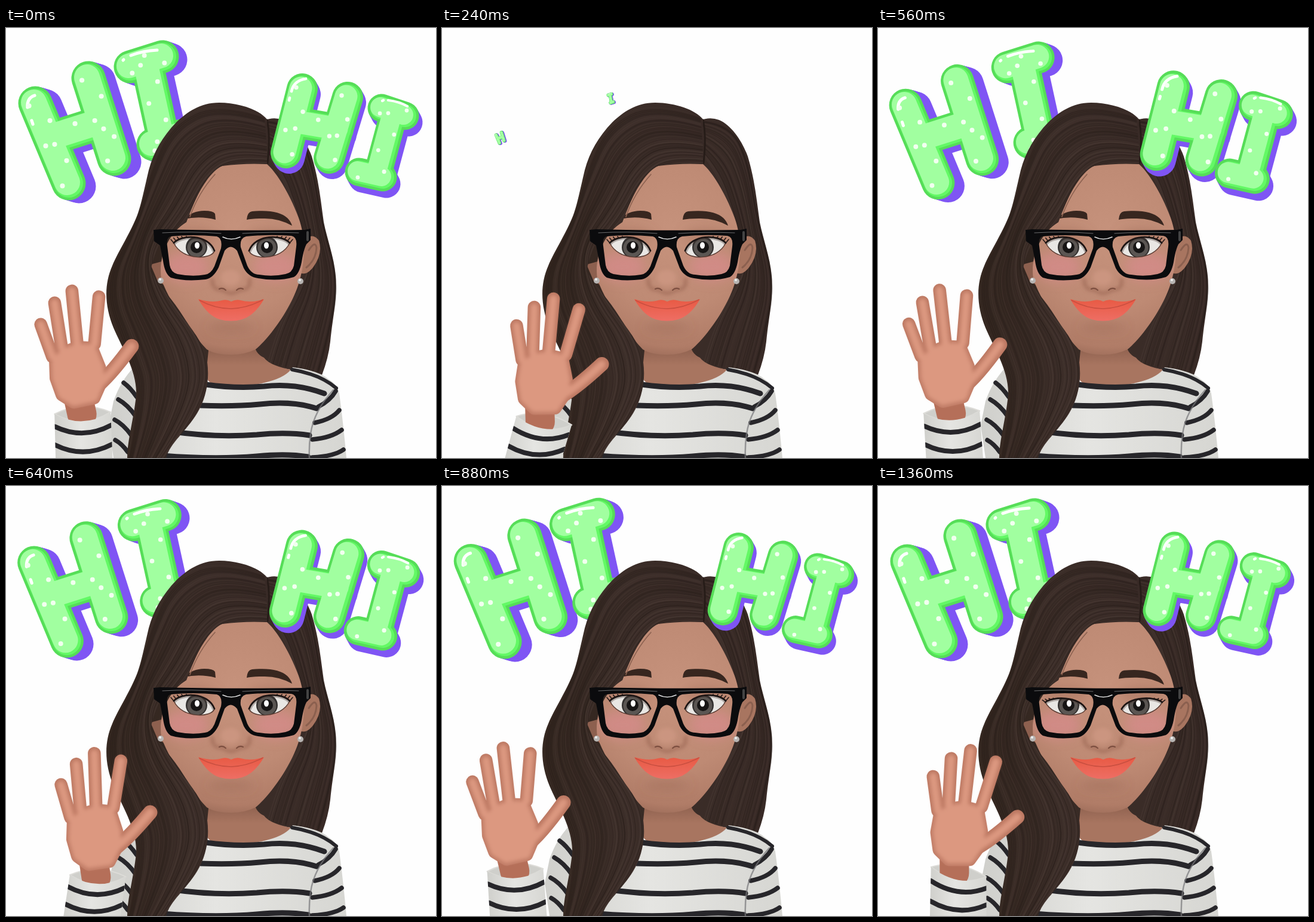
Animation, 720 px wide and 720 px high, one loop 1440 ms. Source, as an HTML page:

```html
<!DOCTYPE html>
<html lang="en">
<head>
<meta charset="utf-8">
<title>Waving hello</title>
<style>
html, body { margin: 0; width: 100%; height: 100%; overflow: hidden; background: #fefefe; }
svg { display: block; width: 100vw; height: 100vh; }
path { stroke-linecap: round; stroke-linejoin: round; }
</style>
</head>
<body>
<svg viewBox="0 0 720 720">
<defs>
  <radialGradient id="skin" gradientUnits="userSpaceOnUse" cx="388" cy="345" r="210">
    <stop offset="0" stop-color="#c6927c"/><stop offset=".6" stop-color="#be8a74"/>
    <stop offset=".9" stop-color="#b07c67"/><stop offset="1" stop-color="#9c6c59"/>
  </radialGradient>
  <linearGradient id="neck" x1="0" y1="0" x2="0" y2="1">
    <stop offset="0" stop-color="#875b4a"/><stop offset=".5" stop-color="#a87560"/>
  </linearGradient>
  <linearGradient id="cloth" x1="0" y1="0" x2="1" y2="0">
    <stop offset="0" stop-color="#cfcfcb"/><stop offset=".45" stop-color="#e5e5e2"/><stop offset="1" stop-color="#d6d6d2"/>
  </linearGradient>
  <linearGradient id="lip" x1="0" y1="0" x2="0" y2="1">
    <stop offset="0" stop-color="#e85a44"/><stop offset="1" stop-color="#ee6e64"/>
  </linearGradient>
  <linearGradient id="hair" x1="0" y1="0" x2="1" y2="0">
    <stop offset="0" stop-color="#33261f"/><stop offset=".5" stop-color="#3b2d28"/><stop offset="1" stop-color="#382a26"/>
  </linearGradient>
  <filter id="soft" x="-30%" y="-30%" width="160%" height="160%"><feGaussianBlur stdDeviation="3"/></filter>
  <filter id="haze" x="-60%" y="-60%" width="220%" height="220%"><feGaussianBlur stdDeviation="9"/></filter>
  <path id="face" d="M362 231Q400 226 437 228C455 243 478 285 490 318C500 345 503 385 491 425C478 470 440 520 418 538Q400 547 377 547Q350 547 336 538C300 500 270 450 260 420C255 385 270 345 302 325C315 285 340 240 362 231Z"/>
  <path id="lock" d="M437 153C425 137 390 125 357 125C325 125 303 141 285 158C262 182 247 208 239 238C229 280 225 305 214 327C200 357 186 378 178 398C164 430 165 465 180 502C194 535 220 575 218 615C214 655 203 690 203 720L268 720C274 695 302 675 320 645C335 620 341 590 337 560C334 530 312 508 298 485C278 452 262 440 242 407C246 385 254 365 264 348Q286 336 302 325C318 285 335 240 362 231Q400 221 437 228Z"/>
  <clipPath id="inLock"><use href="#lock"/></clipPath>
  <clipPath id="inFace"><use href="#face"/></clipPath>
  <clipPath id="inEye"><path id="eyeClip"/></clipPath>
  <clipPath id="inSleeve"><path id="sleeveClip"/></clipPath>
  <g id="eye">
    <g clip-path="url(#inEye)">
      <rect x="270" y="340" width="90" height="55" fill="#e9e7e4"/>
      <circle cx="319" cy="367" r="18" fill="#33302f"/>
      <circle cx="319" cy="368" r="15.5" fill="#5b5653"/>
      <circle cx="319" cy="367" r="10" fill="#171515"/>
      <path class="lash" fill="none" stroke="#4a3a36" stroke-opacity=".35" stroke-width="8"/>
      <ellipse cx="320" cy="364" rx="4" ry="5.5" fill="#fff"/>
    </g>
    <path id="rim" fill="none" stroke="#5a3c33" stroke-width="1.5"/>
    <path class="lash" fill="none" stroke="#1c1413" stroke-width="2.8"/>
    <path id="lashes" fill="none" stroke="#211816" stroke-width="1.6"/>
  </g>
</defs>

<g id="leftWord"></g>

<!-- back hair, ears, neck -->
<path fill="url(#hair)" d="M432 155Q448 148 464 154C485 163 503 190 512 215C524 255 527 290 532 325C538 355 549 382 552 415C555 455 546 490 543 525Q540 552 529 581L435 565L330 560L205 430L235 320L300 180Z"/>
<g id="rightHair" fill="none"></g>
<path d="M437 154Q443 180 438 226" fill="none" stroke="#261c18" stroke-width="3"/>
<path d="M496 360Q512 339 524 356Q531 378 514 401Q502 416 490 409Z" fill="#a87560"/>
<path d="M507 372Q518 355 520 368Q519 388 503 401" fill="none" stroke="#8b604f" stroke-width="3"/>
<path d="M242 396L264 390L268 432L254 424Z" fill="#8d604f"/>
<path d="M340 530L335 580Q334 604 400 604Q460 600 482 573Q442 566 432 552Q416 545 415 525Z" fill="url(#neck)"/>

<!-- shirt -->
<path d="M480 568Q525 574 540 588Q555 597 558 612Q564 655 570 720H180L172 665L180 625Q192 590 216 566L320 592Q395 606 440 592Q470 584 480 568Z" fill="url(#cloth)"/>
<g fill="none" stroke="#27262a" stroke-width="7.5">
  <path d="M335 597Q385 604 432 600Q485 594 533 612M326 632Q380 634 425 630Q480 624 520 637M280 676Q350 686 420 681Q470 676 508 682M262 716Q350 723 420 717Q470 712 506 718" stroke-width="9"/>
  <path d="M479 572Q526 580 553 603" stroke-width="6"/>
  <path d="M552 608Q543 624 523 634M558 640Q546 655 517 661M562 673Q545 686 513 689M565 706Q550 717 513 719"/>
  <path d="M197 594Q208 602 219 618M188 622Q204 631 217 650M182 656Q196 663 210 682M183 690Q194 696 204 710"/>
</g>
<path d="M548 606Q515 642 510 680Q507 700 508 720" fill="none" stroke="#77777a" stroke-width="2.5" stroke-opacity=".7"/>

<!-- face -->
<use href="#face" fill="url(#skin)"/>
<g clip-path="url(#inFace)">
  <g filter="url(#haze)">
    <ellipse cx="302" cy="400" rx="38" ry="24" fill="#d68b8b" opacity=".75"/>
    <ellipse cx="452" cy="400" rx="38" ry="24" fill="#d68b8b" opacity=".75"/>
    <ellipse cx="316" cy="348" rx="36" ry="12" fill="#a06d59" opacity=".45"/>
    <ellipse cx="440" cy="348" rx="36" ry="12" fill="#a06d59" opacity=".45"/>
    <ellipse cx="377" cy="501" rx="38" ry="7" fill="#925f4e" opacity=".4"/>
  </g>
  <g filter="url(#soft)">
    <path d="M345 420Q345 440 362 438Q377 450 392 438Q410 440 408 420" fill="none" stroke="#9c6855" stroke-width="4"/>
    <ellipse cx="376" cy="418" rx="16" ry="13" fill="#cb9580"/>
  </g>
  <path d="M357 437Q363 434 368 439M386 439Q391 434 397 437" fill="none" stroke="#7d4f40" stroke-width="2"/>
</g>
<path d="M322 454Q345 461 362 456Q370 454 377 458Q385 454 393 456Q410 461 432 454Q416 482 395 488Q377 493 358 488Q338 482 322 454Z" fill="url(#lip)"/>
<path d="M324 456Q350 470 377 470Q405 469 430 455" fill="none" stroke="#c94f40" stroke-width="1.5"/>
<g id="brows" fill="#37261f">
  <path d="M298 320Q312 306 332 306Q347 306 350 311L351 321Q325 314 298 320Z"/>
  <path d="M403 321Q404 308 412 307Q455 303 471 318Q477 324 479 331Q456 318 430 319Q412 319 403 321Z"/>
</g>
<use href="#eye"/>
<use href="#eye" transform="matrix(-1 0 0 1 756 0)"/>

<!-- front hair -->
<use href="#lock" fill="url(#hair)"/>
<g id="leftHair" fill="none" clip-path="url(#inLock)"></g>
<path d="M350 245Q322 276 308 316" fill="none" stroke="#8b6150" stroke-width="1.6"/>
<g fill="#b7b4b2"><circle cx="259" cy="423" r="5"/><circle cx="493" cy="424" r="5"/></g>
<g fill="#eee"><circle cx="258" cy="421" r="2"/><circle cx="492" cy="422" r="2"/></g>

<!-- glasses -->
<path fill="#0b0b0d" fill-rule="evenodd" d="M247 338L258 337Q375 340 500 338L510 336V355L503 362Q498 372 495 392Q491 412 482 417Q455 425 422 419Q406 417 398 402L387 373Q376 360 366 373L356 401Q347 419 334 421Q300 425 276 418Q266 412 263 390L258 364L248 357Z
  M275 349Q268 352 270 365L274 397Q276 409 287 412Q312 417 333 413Q343 412 349 399L360 369Q363 352 353 349Q312 345 275 349Z
  M402 349Q391 352 393 367L404 398Q411 413 424 413Q446 417 468 412Q479 410 482 398L486 366Q488 350 478 348Q440 345 402 349Z"/>
<g fill="none" stroke="#fff">
  <path d="M363 350Q377 357 392 350" stroke-width="1.6" opacity=".85"/>
  <path d="M262 343Q310 340 360 344M396 344Q440 341 490 343" opacity=".4"/>
  <path d="M505 342V355" stroke="#444" stroke-width="4"/>
</g>

<g id="rightWord"></g>
<g id="arm"></g>
</svg>
<script>
const $ = id => document.getElementById(id);
const STEP = 80, COUNT = 18;
const { PI, abs, cos, sin, exp, max, min } = Math;
const lerp = (a, b, t) => a + (b - a) * t;
const mix = (a, b, t) => a.map((v, i) => lerp(v, b[i], t));
const polar = (r, deg) => [r * sin(deg * PI / 180), -r * cos(deg * PI / 180)];
const add = (a, b) => [a[0] + b[0], a[1] + b[1]];

function make(parent, tag, attrs) {
  const el = document.createElementNS('http://www.w3.org/2000/svg', tag);
  for (const k in attrs) el.setAttribute(k, attrs[k]);
  return parent.appendChild(el);
}

function smooth(pts) {
  let d = `M${pts[0]}`;
  for (let i = 1; i < pts.length - 1; i++) {
    const end = i === pts.length - 2 ? pts[i + 1] : mix(pts[i], pts[i + 1], .5);
    d += `Q${pts[i]} ${end}`;
  }
  return d;
}

// Hair strands, spread between two guide curves
let seed = 7;
const rand = () => (seed = seed * 16807 % 2147483647) / 2147483647;
function strands(parent, count, outer, inner) {
  for (let i = 0; i < count; i++) {
    const u = (i + rand()) / count;
    make(parent, 'path', {
      d: smooth(outer.map((p, j) => mix(p, inner[j], u))),
      stroke: rand() < .55 ? '#261c18' : '#4a3b35',
      'stroke-width': .8 + rand() * 2,
      opacity: .15 + rand() * .4
    });
  }
}
strands($('leftHair'), 40,
  [[432, 148], [355, 122], [275, 160], [240, 240], [218, 325], [158, 430], [196, 540], [225, 610], [204, 720]],
  [[438, 226], [385, 222], [340, 250], [300, 325], [240, 385], [275, 450], [345, 535], [340, 630], [268, 720]]);
strands($('rightHair'), 26,
  [[440, 155], [482, 160], [512, 215], [528, 320], [560, 425], [542, 520], [526, 576]],
  [[439, 215], [462, 245], [485, 310], [510, 400], [490, 440], [455, 500], [438, 562]]);

// Balloon letters: bars as [x1, y1, x2, y2], with dots zigzagging along each
function letter(parent, { center: [cx, cy], bars, w, shade: [sx, sy], shine }) {
  const g = make(parent, 'g', {});
  const d = bars.map(([a, b, c, e]) => `M${a} ${b}L${c} ${e}`).join('');
  const line = (stroke, width, x = 0, y = 0, path = d) => make(g, 'path', {
    d: path, fill: 'none', stroke, 'stroke-width': width, transform: `translate(${x} ${y})`
  });
  for (const k of [1, .75, .5, .25]) line('#7f55f4', w, sx * k, sy * k);
  line('#56dd58', w);
  line('#63f965', w - 9);
  line('#a1ffa0', w - 14, -2.5, -1.5);
  line('#fff', w / 11, 0, 0, shine);
  for (const [x1, y1, x2, y2] of bars) {
    const len = Math.hypot(x2 - x1, y2 - y1), n = Math.round(len / 36);
    for (let i = 0; i <= n; i++) {
      const side = (i % 2 ? -1 : 1) * w * .2 / len;
      make(g, 'circle', {
        cx: lerp(x1, x2, i / n) + (y1 - y2) * side,
        cy: lerp(y1, y2, i / n) + (x2 - x1) * side,
        r: w / 14, fill: '#f2fff0'
      });
    }
  }
  return (scale, dx = 0, dy = 0) => {
    g.style.display = scale > 0 ? '' : 'none';
    g.setAttribute('transform', `translate(${cx + dx} ${cy + dy}) scale(${scale}) translate(${-cx} ${-cy})`);
  };
}
const bigH = letter($('leftWord'), {
  center: [122, 174], w: 57, shade: [17, 5], shine: 'M36 133Q35 117 48 113M43 155L45 161',
  bars: [[49, 126, 105, 260], [138, 84, 181, 219], [78, 184, 160, 158]]
});
const bigI = letter($('leftWord'), {
  center: [245, 122], w: 55, shade: [14, 5], shine: 'M209 46Q230 38 253 37M196 54L197 53',
  bars: [[208, 65, 262, 48], [236, 60, 264, 188], [246, 195, 294, 180]]
});
const smallH = letter($('rightWord'), {
  center: [522, 162], w: 52, shade: [5, 9], shine: 'M478 106Q482 88 502 85M475 117L474 121',
  bars: [[496, 102, 469, 209], [572, 116, 541, 218], [486, 158, 556, 170]]
});
const smallI = letter($('rightWord'), {
  center: [632, 198], w: 47, shade: [6, 11], shine: 'M640 121Q658 123 672 131M630 122L632 121',
  bars: [[629, 134, 668, 147], [649, 145, 624, 238], [591, 241, 631, 250]]
});

// Pop-in: grow over `rise` steps, then a damped wobble
function pop(t, rise, amp, decay) {
  if (t < 0) return 0;
  if (t < rise) return lerp(.1, 1, t / rise);
  return 1 + amp * exp(-decay * (t - rise)) * cos(.9 * (t - rise));
}

function setWords(step) {
  const first = step === 0;
  const s = first ? 1 : pop(step - 3, 1, .09, .35);
  const r = first ? 1 : pop(step - 5, 2, .055, .2);
  const spread = max(0, min(1, 7 * (1 - s)));
  bigH(s, -24 * spread, 10 * spread);
  bigI(s, 37 * spread, -4 * spread);
  smallH(r);
  smallI(r);
}

// Eyes: upper and lower lid as cubics that meet when shut
const openLid = [[281, 360], [292, 346], [338, 344], [349, 373]];
const shutLid = [[276, 373], [292, 384], [325, 387], [344, 376]];
const lowLid = [[281, 360], [295, 390], [345, 388], [349, 373]];
const curve = ([a, b, c, d]) => `M${a}C${b} ${c} ${d}`;
function along(pts, t) {
  while (pts.length > 1) pts = pts.slice(1).map((p, i) => mix(pts[i], p, t));
  return pts[0];
}
function setEyes(step) {
  const k = max(0, 1 - abs(step - 14) / (step < 14 ? 2 : 3.6));
  const blend = lid => lid.map((p, i) => mix(p, shutLid[i], k));
  const top = blend(openLid), low = blend(lowLid);
  $('eyeClip').setAttribute('d', `${curve(top)}C${low[2]} ${low[1]} ${low[0]}Z`);
  $('rim').setAttribute('d', curve(low));
  document.querySelectorAll('.lash').forEach(el => el.setAttribute('d', curve(top)));
  let d = '';
  for (let u = 0; u < 1; u += .09) {
    const open = max(0, 1 - 2 * u);
    d += `M${along(top, u)}l${mix([-5 * open, -6 * open], [-4 + 5 * u, 7], k)}`;
  }
  $('lashes').setAttribute('d', d);
  $('brows').setAttribute('transform', `translate(0 ${11 * k})`);
}

// Arm and hand
const fingers = [
  { root: [-41, -26], reach: 100, angle: -34 },
  { root: [-25, -40], reach: 121, angle: -14.5 },
  { root: [1, -46], reach: 135, angle: 0 },
  { root: [30, -45], reach: 130, angle: 20 }
];
const thumb = { root: [26, 30], bend: [50, 14], reach: 100, angle: 69 };
const palm = [[-36, -18], [-22, -32], [1, -40], [25, -38], [37, -5], [38, 20], [26, 45], [-8, 51], [-27, 38], [-36, 10]];

const arm = $('arm');
const part = (attrs, parent = arm) => make(parent, 'path', { fill: 'none', ...attrs });
const cuff = part({ fill: '#cfcfcb', stroke: '#dddcd8', 'stroke-width': 2 });
const wrist = part({ stroke: '#b56f59', 'stroke-width': 49 });
const sleeve = part({ fill: 'url(#cloth)' });
const bands = part({ stroke: '#27262a', 'stroke-width': 8, 'clip-path': 'url(#inSleeve)' });
const palmEdge = part({ fill: '#c07c66', stroke: '#c07c66', 'stroke-width': 22 });
const fingerEdge = part({ stroke: '#bb7761', 'stroke-width': 21.5 });
const thumbEdge = part({ stroke: '#bb7761', 'stroke-width': 24 });
const glow = make(arm, 'g', { filter: 'url(#soft)' });
const palmGlow = part({ fill: '#dc9880', stroke: '#dc9880', 'stroke-width': 13 }, glow);
const fingerGlow = part({ stroke: '#dc9880', 'stroke-width': 13 }, glow);

// Wave phase runs about one sixth of a swing per step, ahead or behind by a little
const drift = [[0, 1], [3, 0], [5, -1], [8, 0], [11, 1], [14, 1], [17, 0]];
function wavePhase(step) {
  const i = max(1, drift.findIndex(([at]) => at >= step));
  const [t0, v0] = drift[i - 1], [t1, v1] = drift[i];
  return step + lerp(v0, v1, (step - t0) / (t1 - t0));
}

function setArm(step) {
  const phase = wavePhase(step);
  const swing = cos((phase - 3.3) * PI / 3);
  const flick = ((1 + cos((phase - 4.15) * PI / 3)) / 2) ** 5;
  const lean = -1 + 4 * swing + 28 * flick, turn = (lean + 2) * PI / 180;
  const center = [142 + 30 * swing, 581 + 8 * swing - 8 * flick];
  const spin = ([x, y]) => [x * cos(turn) - y * sin(turn), x * sin(turn) + y * cos(turn)];
  const local = p => add(center, spin(p));
  const tip = f => add(center, polar(f.reach, lean + f.angle));

  const digits = fingers.map(f => `M${local(f.root)}L${tip(f)}`).join('');
  const thumbLine = `M${local(thumb.root)}Q${local(thumb.bend)} ${tip(thumb)}`;
  const body = `M${palm.map(local).join('L')}Z`;
  palmEdge.setAttribute('d', body);
  palmGlow.setAttribute('d', body);
  fingerEdge.setAttribute('d', digits);
  thumbEdge.setAttribute('d', thumbLine);
  fingerGlow.setAttribute('d', digits + thumbLine);

  const hinge = local([5, 72]), mouth = add(hinge, [lean / 2 + 3, -2]);
  const left = add(mouth, spin([-47, 0])), right = add(mouth, spin([47, 0]));
  const footL = [lerp(85, left[0], .45), 730], footR = [lerp(182, right[0], .45), 730];
  const bow = (a, b, depth) => `Q${add(mix(a, b, .5), [0, depth])} ${b}`;
  const shape = `M${left}${bow(left, right, 27)}L${footR}L${footL}Z`;
  wrist.setAttribute('d', `M${local([0, 45])}L${hinge}`);
  cuff.setAttribute('d', `M${left}${bow(left, right, -22)}${bow(right, left, 27)}Z`);
  sleeve.setAttribute('d', shape);
  $('sleeveClip').setAttribute('d', shape);
  bands.setAttribute('d', [.25, .62, .98].map(u => {
    const a = mix(left, footL, u), b = mix(right, footR, u);
    return `M${a}${bow(a, b, 24)}`;
  }).join(''));
}

const begin = performance.now();
let shown = -1;
function tick() {
  const step = Math.floor((performance.now() - begin) / STEP) % COUNT;
  if (step !== shown) {
    shown = step;
    setWords(step);
    setEyes(step);
    setArm(step);
  }
  requestAnimationFrame(tick);
}
tick();
</script>
</body>
</html>
```
